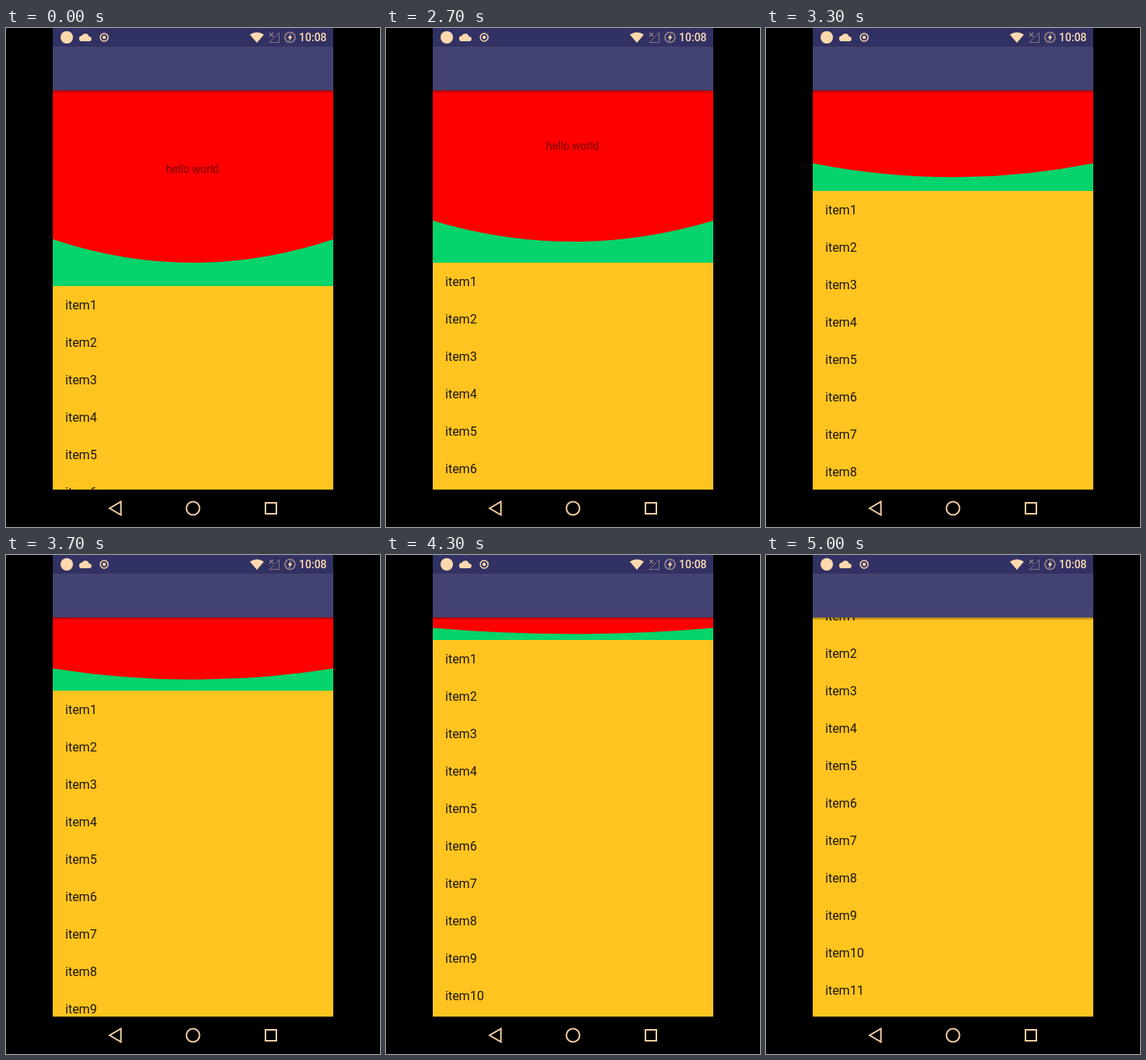
Animation of 480 by 640 pixels, one loop 5100 ms. Source, as an HTML page:

```html
<!DOCTYPE html>
<html lang="en">
<head>
<meta charset="utf-8">
<title>Collapsing header</title>
<style>
  html, body { margin: 0; width: 100%; height: 100%; overflow: hidden; background: #000; }
  svg { display: block; width: 480px; height: 640px; font-family: Roboto, sans-serif; }
  .row { font-size: 16px; fill: #1c1505; }
  .hello { font-size: 14px; fill: #000; fill-opacity: .54; text-anchor: middle; }
  .clock { font-size: 14px; font-weight: 500; fill: #ffdcb4; }
  .icon { fill: #ffd9ae; }
  .line { fill: none; stroke: #ffd9ae; }
  .nav { fill: none; stroke: #f3cda1; stroke-width: 2; }
</style>
</head>
<body>
<svg viewBox="0 0 480 640">
  <defs>
    <clipPath id="page"><rect x="60" y="80" width="360" height="512"/></clipPath>
    <linearGradient id="shade" x2="0" y2="1">
      <stop offset="0" stop-opacity=".36"/>
      <stop offset="1" stop-opacity="0"/>
    </linearGradient>
  </defs>
  <rect width="480" height="640"/>

  <g clip-path="url(#page)">
    <rect x="60" y="80" width="360" height="512" fill="#05d36b"/>
    <path id="curve" fill="#f00"/>
    <text id="hello" class="hello" x="239.5">hello world</text>
    <g id="list"><rect x="60" width="360" height="600" fill="#ffc41f"/></g>
    <rect x="60" y="80" width="360" height="4" fill="url(#shade)"/>
  </g>

  <rect x="60" width="360" height="24" fill="#313163"/>
  <rect x="60" y="24" width="360" height="56" fill="#434373"/>

  <circle class="icon" cx="78" cy="12" r="8"/>
  <path class="icon" d="M97.500 17a3.500 3.500 0 0 1-.3-7a5 5 0 0 1 9.300 1a3 3 0 0 1 .5 6z"/>
  <circle class="line" cx="126" cy="12" r="5" stroke-width="1.500"/>
  <circle class="icon" cx="126" cy="12" r="2.200"/>
  <path class="icon" d="M313 8.500Q322 2.500 331 8.500L322 19z"/>
  <path class="line" d="M350.500 6V18.500H338z" stroke-opacity=".42"/>
  <path class="line" d="M338 6l5 5m0-5l-5 5" stroke-opacity=".8"/>
  <circle class="line" cx="364.500" cy="12" r="6.500" stroke-width="1.700" stroke-opacity=".5"/>
  <path class="icon" d="M366 7l-4.500 6h2.500l-1 4.500l4.500-6.500h-2.500z"/>
  <text class="clock" x="376" y="17">10:08</text>

  <path class="nav" d="M147.500 607.500v17l-14.500-8.500z"/>
  <circle class="nav" cx="240" cy="616" r="8.500"/>
  <rect class="nav" x="333" y="609" width="14" height="14"/>
</svg>
<script>
  const LOOP = 5100, STEP = 100, ROW = 48;
  // [time, top edge of the list]
  const KEYS = [[2400, 331], [2500, 329], [3000, 239], [3700, 174], [4100, 131], [4600, 79], [5000, 54]];
  const $ = id => document.getElementById(id);
  const curve = $('curve'), hello = $('hello'), list = $('list');

  for (let i = 0; i < 12; i++) {
    const row = document.createElementNS('http://www.w3.org/2000/svg', 'text');
    row.setAttribute('class', 'row');
    row.setAttribute('x', 76);
    row.setAttribute('y', i * ROW + 30);
    row.textContent = 'item' + (i + 1);
    list.append(row);
  }

  const slope = i => (KEYS[i + 1][1] - KEYS[i][1]) / (KEYS[i + 1][0] - KEYS[i][0]);

  // Harmonic mean keeps the interpolation monotone.
  function tangent(i) {
    if (i === 0) return slope(0);
    if (i === KEYS.length - 1) return slope(i - 1);
    const a = slope(i - 1), b = slope(i);
    return 2 * a * b / (a + b);
  }

  function listTop(t) {
    if (t <= KEYS[0][0]) return KEYS[0][1];
    let i = 0;
    while (i < KEYS.length - 2 && t >= KEYS[i + 1][0]) i++;
    const [t0, y0] = KEYS[i], [t1, y1] = KEYS[i + 1];
    const d = t1 - t0, u = (t - t0) / d, v = 1 - u;
    return Math.round(y0 * (1 + 2 * u) * v * v + y1 * u * u * (3 - 2 * u)
      + d * u * v * (v * tangent(i) - u * tangent(i + 1)));
  }

  function draw(now) {
    const t = Math.floor(now % LOOP / STEP) * STEP;
    const y = listTop(t);
    const edge = y - Math.max(0, 10 + 0.2 * (y - 81));
    curve.setAttribute('d', `M60 0V${edge}Q240 ${y} 420 ${edge}V0z`);
    hello.setAttribute('y', y - 145);
    list.setAttribute('transform', `translate(0 ${y})`);
  }

  let start;
  function tick(now) {
    start ??= now;
    draw(now - start);
    requestAnimationFrame(tick);
  }
  draw(0);
  requestAnimationFrame(tick);
</script>
</body>
</html>
```
